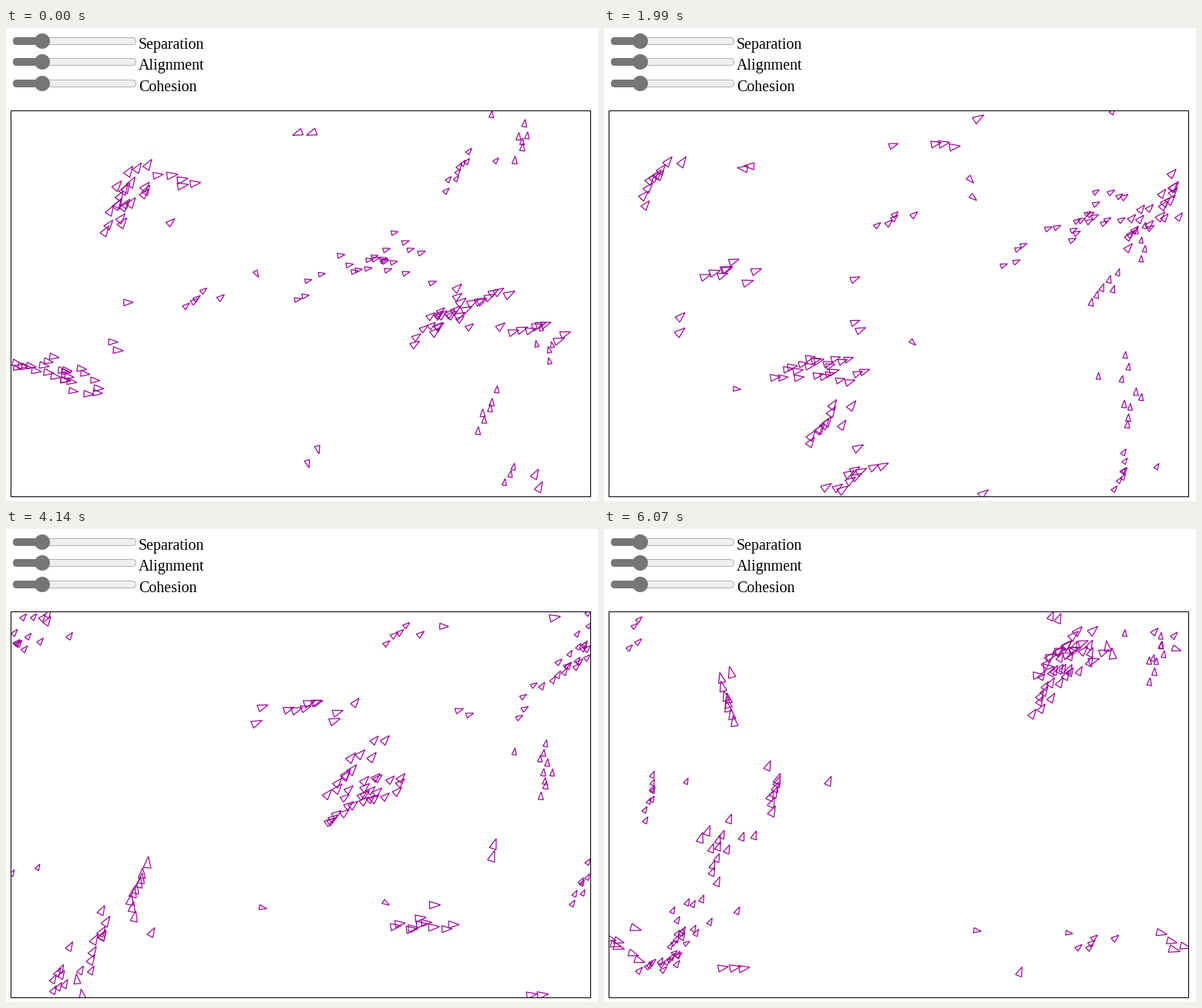
Write a matplotlib script that moves like this. It is 768 px wide and 614 px high and loops after 6.1 s.

```python
import numpy as np
import matplotlib.pyplot as plt
from matplotlib.animation import FuncAnimation
from matplotlib.collections import PolyCollection
from matplotlib.patches import Circle, FancyBboxPatch, Rectangle

W, H, DPI = 768, 614, 100
LOOP_MS, STEP_MS = 6100, 25
PX = 72 / DPI
X0, Y0, FW, FH = 7, 108, 750, 500
PURPLE, GREY = "#990099", "#767676"

rng = np.random.default_rng(4)


class Flock:
    """Birds following one arc from start to end; bend is its sagitta per chord."""

    def __init__(self, n, start, end, bend=0):
        self.start = np.array(start, float)
        self.chord = np.array(end) - self.start
        self.bulge = 4 * bend * np.array([-self.chord[1], self.chord[0]])

        # dense core, thin tail behind, widening fan ahead
        q = (np.arange(n) + 0.5) / n * 2 - 1
        along = 1.9 * np.sign(q) * np.abs(q) ** 1.4
        across = rng.normal(0, 1, n) * (0.2 + 0.65 * np.clip(along, 0, 1.2))
        self.layout = 7 * np.sqrt(n) * np.column_stack([along, across * (n > 1)])
        self.phase = rng.uniform(0, 2 * np.pi, (n, 2))

        # faster birds are drawn larger
        speed = np.hypot(*self.chord) * (1 + 8 / 3 * bend**2) * 1000 / LOOP_MS
        self.size = np.clip(speed / 8.3, 8.5, 14) * rng.uniform(0.93, 1.07, (n, 1))

    def positions(self, u):
        center = self.start + u * self.chord + u * (1 - u) * self.bulge
        vel = self.chord + (1 - 2 * u) * self.bulge
        c, s = vel / np.hypot(*vel)
        turned = self.layout @ np.array([[c, s], [-s, c]])
        return center + turned + 3 * np.sin(8 * u + self.phase)

    def triangles(self, u):
        p = self.positions(u)
        d = self.positions(u + 0.01) - self.positions(u - 0.01)
        d /= np.hypot(d[:, 0], d[:, 1])[:, None]
        side = 0.34 * self.size * np.column_stack([-d[:, 1], d[:, 0]])
        p = (p - (X0, Y0)) % (FW, FH) + (X0, Y0)
        back = p - 0.42 * self.size * d
        return np.stack([p + 0.58 * self.size * d, back + side, back - side], axis=1)


# start and end are unwrapped: paths may leave the field and re-enter opposite
flocks = [
    # upper left
    Flock(11, (155, 234), (768, 43), -0.17),
    Flock(10, (160, 205), (605, -352), -0.03),
    Flock(3, (212, 190), (925, 66)),
    Flock(2, (237, 205), (655, -350), 0.24),
    Flock(1, (214, 250), (750, 160), -0.14),
    Flock(2, (388, 139), (130, -110), -0.55),
    # lower left
    Flock(27, (80, 444), (592, 175), 0.17),
    Flock(1, (17, 442), (487, 519)),
    # right
    Flock(9, (620, 352), (908, -288), 0.19),
    Flock(9, (580, 368), (975, -170), 0.06),
    Flock(12, (560, 380), (905, -90), 0.07),
    Flock(8, (690, 385), (1365, 150)),
    Flock(2, (695, 591), (1330, 190), -0.13),
    Flock(5, (705, 413), (845, 50), -0.16),
    # middle
    Flock(20, (490, 300), (855, 20), 0.11),
    Flock(4, (392, 341), (795, 137), 0.07),
    Flock(5, (250, 349), (637, 32)),
    Flock(1, (328, 316), (605, 525), 0.11),
    # upper right and bottom
    Flock(9, (592, 182), (815, -160), 0.03),
    Flock(7, (668, 142), (715, -335)),
    Flock(6, (620, 496), (820, 60), -0.1),
    Flock(3, (655, 580), (720, 150)),
    Flock(2, (402, 554), (730, 630), 0.45),
]

fig = plt.figure(figsize=(W / DPI, H / DPI), dpi=DPI, facecolor="white")
ax = fig.add_axes([0, 0, 1, 1])
ax.set_xlim(0, W)
ax.set_ylim(H, 0)
ax.axis("off")


def bar(x, y, w, h, **style):
    r = h / 2
    ax.add_patch(FancyBboxPatch((x + r, y + r), w - h, 0.01,
                                boxstyle=f"round,pad={r}", **style))


def slider(y, label):
    bar(9.5, y - 4.5, 159, 9, fc="#efefef", ec="#b2b2b2", lw=PX)
    bar(9, y - 5, 40, 10, fc=GREY, ec="none")
    ax.add_patch(Circle((47, y), 10, fc=GREY, ec="none"))
    ax.text(172, y + 10, label, family="Liberation Serif", size=20 * PX, color="black")


for y, label in zip((17, 44, 72), ("Separation", "Alignment", "Cohesion")):
    slider(y, label)

ax.add_patch(Rectangle((6.5, 107.5), 752, 501, fill=False, ec="black", lw=PX, snap=False))

birds = PolyCollection([], facecolors="none", edgecolors=PURPLE,
                       linewidths=1.2 * PX, joinstyle="miter")
ax.add_collection(birds, autolim=False)
birds.set_clip_path(Rectangle((X0, Y0), FW + 1, FH, transform=ax.transData))


def draw(i):
    u = i * STEP_MS / LOOP_MS
    birds.set_verts(np.concatenate([f.triangles(u) for f in flocks]))
    return (birds,)


anim = FuncAnimation(fig, draw, frames=LOOP_MS // STEP_MS, interval=STEP_MS,
                     repeat=True, repeat_delay=0, blit=True)
plt.show()
```
